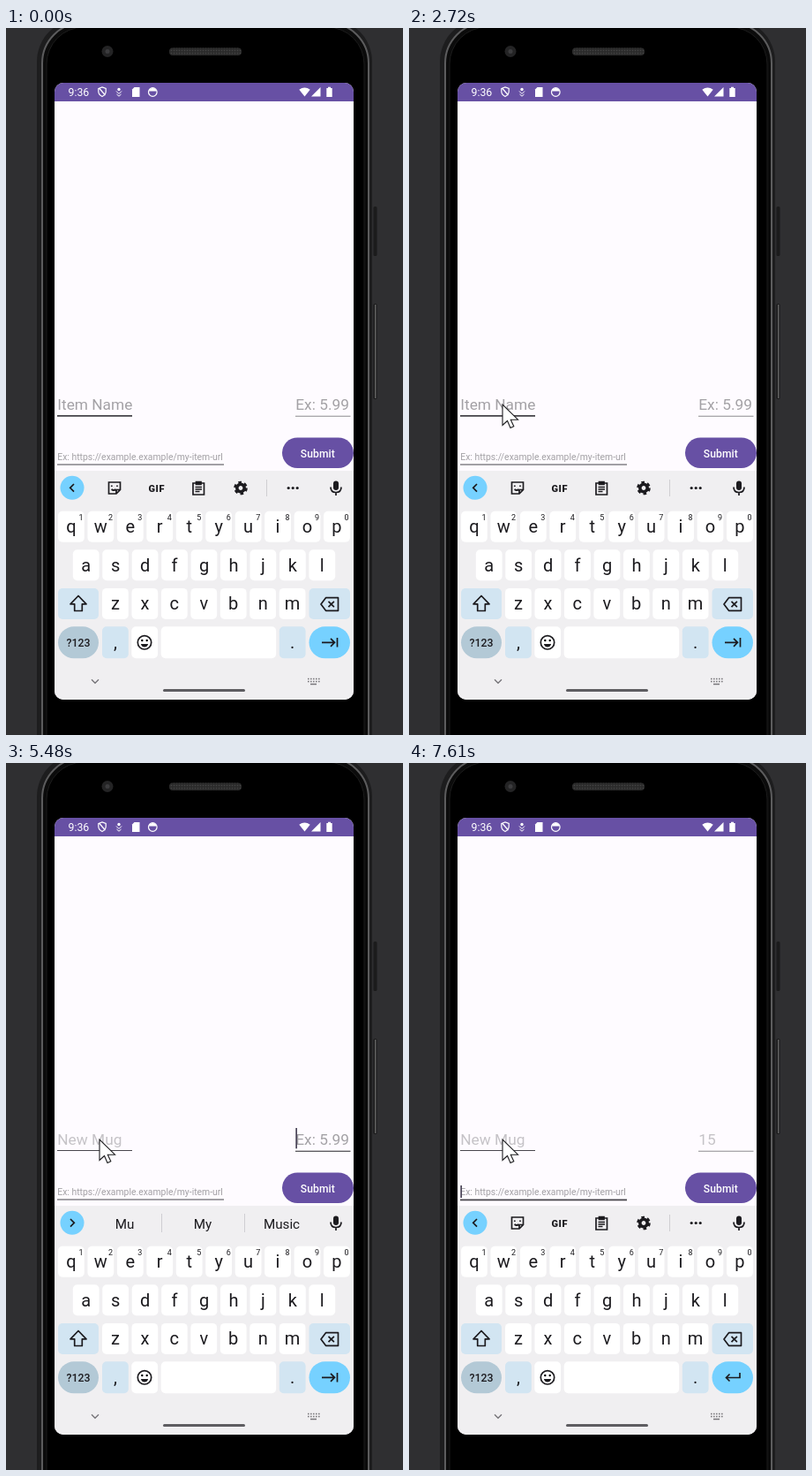
These frames come from a looping animation (450 by 800 pixels, 8000 ms). An HTML page:

```html
<!DOCTYPE html>
<html lang="en">
<head>
<meta charset="utf-8">
<title>Item form</title>
<style>
html, body { margin: 0; width: 100%; height: 100%; overflow: hidden; background: #2f2f31; }
svg { display: block; width: 450px; height: 800px; font-family: Roboto, sans-serif; }
.mid { text-anchor: middle; }
.line { fill: none; stroke: #1c1b1f; stroke-width: 1.7; }
.field { font-size: 17.3px; }
.small { font-size: 10.4px; }
</style>
</head>
<body>
<svg viewBox="0 0 450 800">
  <defs>
    <pattern id="mesh" width="3" height="3" patternUnits="userSpaceOnUse">
      <rect width="3" height="3" fill="#2b2b2b"/><circle cx="1.5" cy="1.5" r=".8" fill="#454545"/>
    </pattern>
    <clipPath id="screen"><rect x="55" y="62" width="339" height="698" rx="10"/></clipPath>
    <g id="erase">
      <path class="line" d="M-10 0L-4.5-7.3H9.5V7.3H-4.5Z" stroke-linejoin="round"/>
      <path class="line" d="M-1.5-3.2L4.9 3.2M4.9-3.2L-1.5 3.2"/>
    </g>
  </defs>

  <!-- Phone body -->
  <rect width="450" height="800" fill="#2f2f31"/>
  <rect x="416.5" y="202" width="4" height="56" rx="1.5" fill="#1b1b1c"/>
  <rect x="416.5" y="312" width="4" height="108" rx="1.5" fill="#1b1b1c"/>
  <path d="M418.8 313V419" stroke="#858585"/>
  <rect x="35" y="-10" width="380" height="900" rx="48" fill="#1d1d1e"/>
  <rect x="41" y="-6" width="370" height="900" rx="46" fill="#0b0b0b" stroke="#5c5c5d" stroke-width="2"/>
  <rect x="46" y="-1" width="360" height="900" rx="42" fill="#000" stroke="#1c1c1c"/>
  <circle cx="115" cy="26.500" r="6.500" fill="#242425"/><circle cx="115" cy="26.500" r="2.500" fill="#3c3c3e"/>
  <rect x="185" y="22.500" width="82" height="8.500" rx="4" fill="url(#mesh)"/>

  <g clip-path="url(#screen)">
    <rect x="55" y="62" width="339" height="698" fill="#fefbff"/>
    <rect x="55" y="62" width="339" height="21" fill="#6750a4"/>
    <g fill="#fff">
      <text x="70.500" y="77" font-size="12.300">9:36</text>
      <path d="M104.800 68.500L109 67L113.200 68.500V72Q113 75.500 109 77.500Q105 75.500 104.800 72ZM105.500 68L112.500 76" fill="none" stroke="#fff" stroke-width="1.200"/>
      <path d="M125 71.500L128 74.500L131 71.500M125.500 75L128 77.200L130.500 75" fill="none" stroke="#fff"/>
      <circle cx="128" cy="69.500" r="1.700"/>
      <path d="M145.500 67H151.500V78H143V69.500Z"/>
      <circle cx="166.300" cy="72.500" r="4.800" fill="none" stroke="#fff" stroke-width="1.200"/>
      <path d="M162 71.500Q162.500 68 166.300 68T170.600 71.500Z"/>
      <path d="M332.300 69.800Q338.500 65.200 344.700 69.800L338.500 77.500Z"/>
      <path d="M356.500 67V77.500H346Z"/>
      <path d="M363.300 68H365V66.800H368V68H369.700V78H363.300Z"/>
    </g>

    <g id="form">
      <text id="name" class="field" x="58.300" y="431.500"></text>
      <rect id="nameLine" x="58" y="438" width="85" fill="#49474d"/>
      <text id="price" class="field" x="328.300" y="432.300"></text>
      <rect id="priceLine" x="328" y="438.700" width="62.500" height="1.200"/>
      <text class="small" x="58.300" y="489.300" fill="#a3a1a5">Ex: https://example.example/my-item-url</text>
      <rect id="urlLine" x="58" y="493.500" width="189" fill="#49474d"/>
      <rect id="caret" width="1.700" fill="#4a4458"/>
      <rect x="313" y="463.500" width="81" height="34.500" rx="17.250" fill="#6750a4"/>
      <text class="mid" x="353.400" y="485.700" fill="#fff" font-size="12.100" font-weight="500" letter-spacing=".1">Submit</text>
    </g>

    <g id="letters">
      <rect x="55" y="501" width="339" height="260" fill="#f0eff1"/>
      <circle cx="75" cy="520.300" r="13.500" fill="#76d1ff"/>
      <path id="fold" class="line"/>
      <g id="tools">
        <path class="line" d="M117.500 514H129.500V522.500L125 527H116.500V514ZM129.500 522.500H125V527M119.800 517.500V519M126 517.500V519M119.500 522Q122 524 124.500 522" stroke-width="1.500"/>
        <text class="mid" x="170.700" y="524.500" font-size="11" font-weight="900" fill="#1c1b1f" letter-spacing=".6">GIF</text>
        <path class="line" d="M212 515H224.500V528H212ZM215.500 513.500H221V516.500H215.500ZM214.500 519.500H222M214.500 522H222M214.500 524.500H219.500" stroke-width="1.400"/>
        <g transform="translate(266 520.500)">
          <circle r="4.200" fill="none" stroke="#1c1b1f" stroke-width="3.600"/>
          <circle r="6.500" fill="none" stroke="#1c1b1f" stroke-width="2.600" stroke-dasharray="3.600 3.207"/>
        </g>
        <path d="M295.500 511V530" stroke="#cfced2"/>
        <g fill="#1c1b1f"><circle cx="320.200" cy="520.500" r="1.600"/><circle cx="325.200" cy="520.500" r="1.600"/><circle cx="330.200" cy="520.500" r="1.600"/></g>
      </g>
      <g id="words" class="mid" font-size="15.200" fill="#1c1b1f">
        <text x="134.500" y="527"></text><text x="223" y="527"></text><text x="312.500" y="527"></text>
        <path d="M176.500 510V531M270.500 510V531" stroke="#cfced2"/>
      </g>
      <rect x="371" y="512.500" width="6" height="10.500" rx="3" fill="#1c1b1f"/>
      <path class="line" d="M368 519.500Q368 525.500 374 525.500T380 519.500M374 525.500V529"/>
      <g id="letterKeys"></g>
      <path class="line" d="M82 642.500L91 651.800H86.300V659.500H77.700V651.800H73Z" stroke-linejoin="round"/>
      <use href="#erase" x="367" y="652"/>
      <circle class="line" cx="157" cy="695.300" r="7.700"/>
      <circle cx="154.300" cy="693" r="1.200"/><circle cx="159.700" cy="693" r="1.200"/>
      <path d="M152.800 697H161.200Q160 700.500 157 700.500T152.800 697Z" fill="#1c1b1f"/>
      <path id="enter" class="line"/>
    </g>

    <g id="digits">
      <rect x="55" y="539" width="339" height="222" fill="#f0eff1"/>
      <g id="digitKeys"></g>
      <path class="line" d="M345 569.500H355.500M342 606V611H358.500V606"/>
      <use href="#erase" x="350" y="652"/>
      <path class="line" d="M343 694.500L347.500 699L357 689.500"/>
    </g>

    <path d="M97 737.200L101 741.200L105 737.200" fill="none" stroke="#77767a" stroke-width="1.400"/>
    <rect x="178" y="748" width="93" height="3" rx="1.500" fill="#5e5d61"/>
    <path d="M342 736.500H356M342 739.500H356" stroke="#77767a" stroke-width="1.500" stroke-dasharray="1.600 1.400"/>
    <path d="M345 742.500H352" stroke="#77767a" stroke-width="1.500"/>
  </g>

  <path id="mouse" d="M0 0V23.500L5.500 18.500L9 26.500L12.800 24.800L9.300 17.200H17.500Z" fill="#fff" stroke="#1d1d1f" stroke-width="1.100"/>
</svg>

<script>
const LOOP = 8000;
const el = id => document.getElementById(id);
const show = (id, on) => el(id).setAttribute('display', on ? 'inline' : 'none');
const set = (id, attrs) => {
  for (const key in attrs) el(id).setAttribute(key, attrs[key]);
};
const WHITE = '#fff', PALE = '#d2e5f2', BLUE = '#76d1ff';

function key(x, y, w, h, fill, label = '', size = 20, radius = 5, baseline = 24.3, weight = 400) {
  return `<rect x="${x}" y="${y}" width="${w}" height="${h}" rx="${radius}" fill="${fill}"/>` +
    `<text class="mid" x="${x + w / 2}" y="${y + baseline}" font-size="${size}" font-weight="${weight}" fill="#1c1b1f">${label}</text>`;
}

function buildKeyboards() {
  const pitch = 33.45;
  let html = '';
  [['qwertyuiop', 59], ['asdfghjkl', 75.8], ['zxcvbnm', 109]].forEach(([row, left], r) => {
    [...row].forEach((letter, i) => {
      const x = left + i * pitch, y = 546.7 + r * 43.6;
      html += key(x, y, 29.8, 35, WHITE, letter);
      if (r === 0) html += `<text class="mid" x="${x + 26}" y="556.5" font-size="9" fill="#1c1b1f">${(i + 1) % 10}</text>`;
    });
  });
  html += key(59, 634, 46, 35, PALE) + key(343.5, 634, 46.5, 35, PALE);
  html += key(59, 677.3, 46, 36, '#b3c9d6', '?123', 12.3, 18, 22.8, 500);
  html += key(109, 677.3, 29.8, 36, PALE, ',') + key(142.3, 677.3, 29.8, 36, WHITE);
  html += key(175.7, 677.3, 130.5, 36, WHITE) + key(309.8, 677.3, 29.8, 36, PALE, '.');
  html += key(343.5, 677.3, 46.5, 36, BLUE, '', 20, 18);
  el('letterKeys').innerHTML = html;

  const sides = [PALE, PALE, '#e4deff', BLUE];
  el('digitKeys').innerHTML = ['123', '456', '789', ',0.'].map((row, r) => {
    const y = 546.7 + r * 42.9;
    return [...row].map((d, i) => key(59 + i * 83.8, y, 80, 38, WHITE, d, 26, 19, 29.3)).join('') +
      key(310.3, y, 80, 38, sides[r], '', 20, 19);
  }).join('');
}

// Each entry takes effect at its time and holds until the next one.
const nameSteps = [[0, ''], [4280, 'N'], [4540, 'Ne'], [4700, 'New'], [4870, 'New '], [5140, 'New M'], [5210, 'New Mu'], [5280, 'New Mug']];
const priceSteps = [[0, ''], [6290, '1'], [6350, '15']];
const wordSteps = [[0, ''], [4340, 'I,New,No'], [4620, 'Ne,New,Me'], [4780, 'New,Now,no'], [4940, 'one,and,is'], [5210, 'Mu,My,Music'], [6750, '']];
const caretSteps = [[0, 0], [250, 1], [720, 0], [1250, 1], [1720, 0], [2180, 1], [2720, 0], [3200, 1], [3680, 0],
  [4210, 1], [5960, 0], [6290, 1], [7080, 0], [7610, 1]];
const focusSteps = [[0, 'name'], [5480, 'price'], [6620, 'url']];
const at = (steps, t) => steps.filter(step => step[0] <= t).pop()[1];

function fillField(id, value, hint) {
  el(id).textContent = value || hint;
  set(id, { fill: value ? '#c5c3c7' : '#a3a1a5', 'xml:space': 'preserve' });
}

function caretOffset(id, value) {
  return value ? el(id).getComputedTextLength() : 0;
}

function drawMouse(t) {
  show('mouse', t >= 250);
  const p = Math.min(1, Math.max(0, (t - 250) / 950));
  const left = (1 - p) ** 2;
  set('mouse', { transform: `translate(${106 + 248 * left} ${426 + 301 * left})` });
}

function draw(t) {
  const name = at(nameSteps, t), price = at(priceSteps, t);
  const focus = at(focusSteps, t), words = at(wordSteps, t);
  const numeric = t >= 5550 && t < 6750;

  fillField('name', name, 'Item Name');
  fillField('price', price, 'Ex: 5.99');
  set('nameLine', { height: focus === 'name' ? 1.8 : 1 });
  set('priceLine', { fill: focus === 'price' ? '#49474d' : '#a09ea2' });
  set('urlLine', { height: focus === 'url' ? 1.8 : 1 });
  set('form', { transform: `translate(0 ${numeric ? 38 : 0})` });

  const x = focus === 'price' ? 328.3 + caretOffset('price', price)
    : focus === 'name' ? 58.3 + caretOffset('name', name) : 58.3;
  set('caret', { x, y: focus === 'url' ? 478 : 413, height: focus === 'url' ? 14 : 23.3 });
  show('caret', at(caretSteps, t));

  show('letters', !numeric);
  show('digits', numeric);
  show('tools', !words);
  show('words', words);
  words.split(',').forEach((word, i) => { el('words').children[i].textContent = word; });
  set('fold', { d: words ? 'M73 516L77.300 520.300L73 524.600' : 'M77 516L72.700 520.300L77 524.600' });
  set('enter', { d: focus === 'url'
    ? 'M375 690V695.500H359.500M363.500 691.500L359.500 695.500L363.500 699.500'
    : 'M358 695.300H372.500M368 690.800L372.500 695.300L368 699.800M375.500 690V700.600' });
  drawMouse(t);
}

buildKeyboards();
const start = performance.now();
function frame() {
  draw((performance.now() - start) % LOOP);
  requestAnimationFrame(frame);
}
frame();
</script>
</body>
</html>
```
